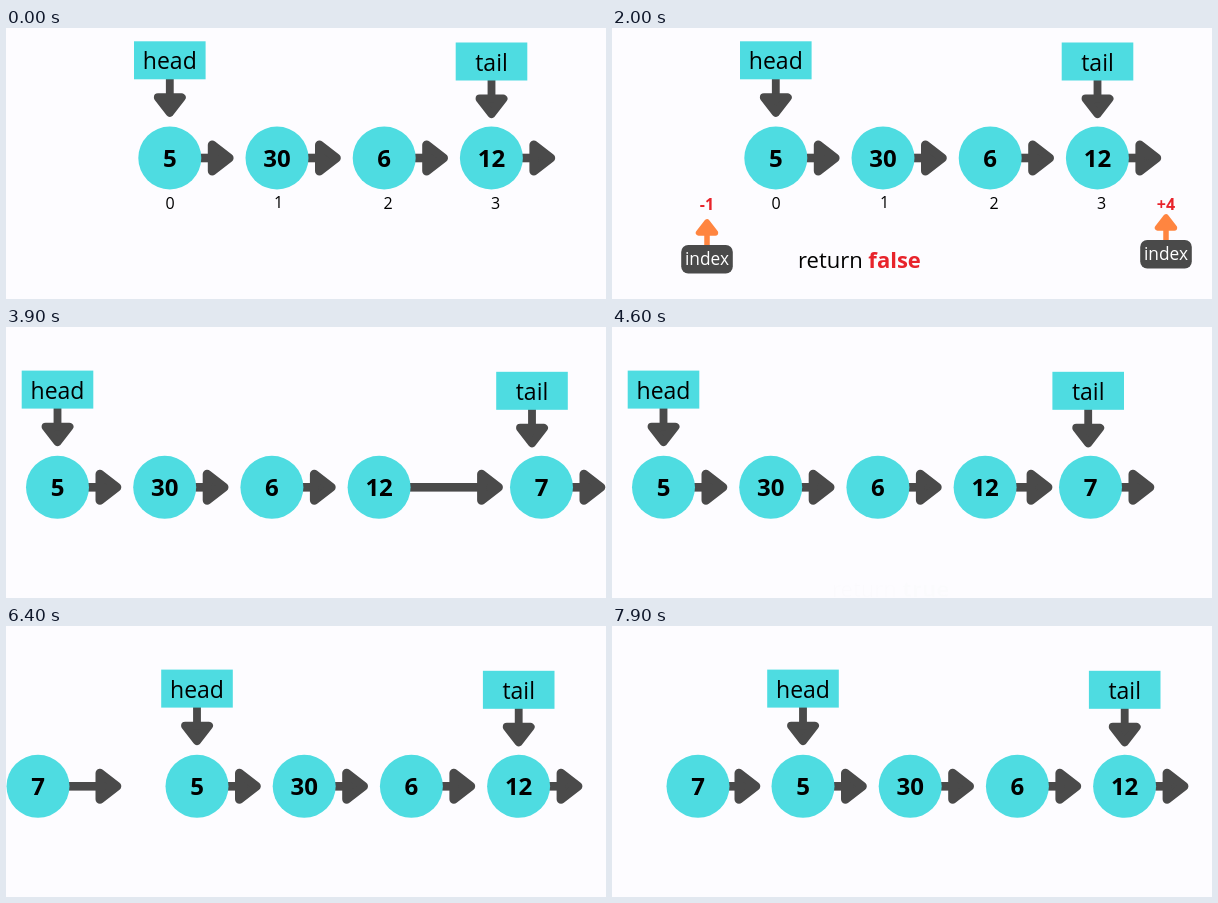
These frames come from a looping animation (600x271 px, 8 s). An HTML page:

```html
<!DOCTYPE html>
<html lang="en">
<head>
<meta charset="utf-8">
<title>Linked list insertion</title>
<style>
  html, body { margin: 0; width: 100%; height: 100%; overflow: hidden; background: #fdfcff; }
  svg { display: block; width: 100vw; height: 100vh; font-family: "Open Sans", "Noto Sans", sans-serif; }
</style>
</head>
<body>
<svg id="stage" viewBox="0 0 600 271"></svg>
<script>
const LOOP = 8000;
const CYAN = '#4edce1', DARK = '#4a4a4a', ORANGE = '#ff8540', RED = '#e8232b', GREEN = '#20b158';
const RADIUS = 31.5, SPACING = 107.2;
const stage = document.getElementById('stage');

const progress = (t, start, end) => Math.min(1, Math.max(0, (t - start) / (end - start)));
const ease = p => p * p * (3 - 2 * p);
const easeOut = p => 1 - (1 - p) ** 3;
const tween = (t, start, end, a, b, curve = ease) => a + (b - a) * curve(progress(t, start, end));

const text = (x, y, size, content, fill = '#000', weight = 400, anchor = 'middle') =>
  `<text x="${x}" y="${y}" font-size="${size}" font-weight="${weight}" fill="${fill}" text-anchor="${anchor}">${content}</text>`;

// Points right before rotation; (x, y) is the start of the stem.
function arrow(x, y, length, angle = 0, scale = 1, color = DARK) {
  const n = length / scale;
  return `<g transform="translate(${x} ${y}) rotate(${angle}) scale(${scale})" fill="${color}">
    <rect x="-1" y="-4.3" width="${n - 19}" height="8.6"/>
    <path d="M${n - 21.5} -13V13L${n - 4.7} 0Z" stroke="${color}" stroke-width="9" stroke-linejoin="round"/></g>`;
}

function node(x, y, value, reach = 32.5) {
  return arrow(x + RADIUS, y, reach) +
    `<circle cx="${x}" cy="${y}" r="${RADIUS}" fill="${CYAN}"/>` +
    text(x, y + 8.6, 24, value, '#000', 700);
}

function pointer(x, y, label) {
  return arrow(x, y + 38, 37.7, 90, 0.91) +
    `<rect x="${x - 35.8}" y="${y}" width="71.6" height="38" fill="${CYAN}"/>` +
    text(x, y + 28, 23, label);
}

function chain(x, y, tailX, lastReach) {
  const nodes = [5, 30, 6, 12].map((value, i) =>
    node(x + i * SPACING, y, value, i === 3 ? lastReach : undefined));
  return nodes.join('') + pointer(x, y - 116.7, 'head') + pointer(tailX, y - 115.5, 'tail');
}

function rise(t, start, end, content) {
  const p = progress(t, start, end);
  return p ? `<g opacity="${p}" transform="translate(0 ${30 * (1 - easeOut(p))})">${content}</g>` : '';
}

function indexMarker(x, y, label) {
  return text(x, 182, 16, label, RED, 700) +
    arrow(x, y, 26, -90, 0.64, ORANGE) +
    `<rect x="${x - 25.8}" y="${y}" width="51.6" height="28.5" rx="7" fill="${DARK}"/>` +
    text(x, y + 20, 17.3, 'index', '#fff');
}

const returns = (x, value, color) =>
  text(x, 240, 22, `return <tspan font-weight="700" fill="${color}">${value}</tspan>`, '#000', 400, 'start');

function outOfRange(t) {
  const labels = [[164, 181], [272.5, 180], [382, 181], [489.5, 181]];
  return chain(163.8, 130, 485.5) +
    labels.map(([x, y], i) => text(x, y, 16, i)).join('') +
    rise(t, 300, 900, indexMarker(95, 217, '-1') + indexMarker(554, 212, '+4')) +
    rise(t, 1300, 1800, returns(186, 'false', RED));
}

function append(t) {
  const close = ease(progress(t, 4000, 4500));
  const tailX = tween(t, 3200, 3700, 373.2, 526) - 49.8 * close;
  const x = tween(t, 2300, 2700, 640, 535.5, easeOut) - 57 * close;
  const reach = tween(t, 2800, 3050, 36, 92.5) - 56.5 * close;
  return chain(51.5, 160.3, tailX, reach) + node(x, 160.3, 7) +
    rise(t, 4600, 5000, returns(220, 'true', GREEN));
}

function prepend(t) {
  const close = ease(progress(t, 7150, 7700));
  const x = tween(t, 5450, 5900, -70, 32, easeOut) + 54 * close;
  const reach = tween(t, 6150, 6400, 32.5, 52) - 21 * close;
  return chain(191, 160.3, 512.7) + node(x, 160.3, 7, reach);
}

function draw(now) {
  const t = now % LOOP;
  const scene = t < 2300 ? outOfRange : t < 5300 ? append : prepend;
  stage.innerHTML = scene(t);
}

const begin = performance.now();
function tick() {
  draw(performance.now() - begin);
  requestAnimationFrame(tick);
}
tick();
</script>
</body>
</html>
```
